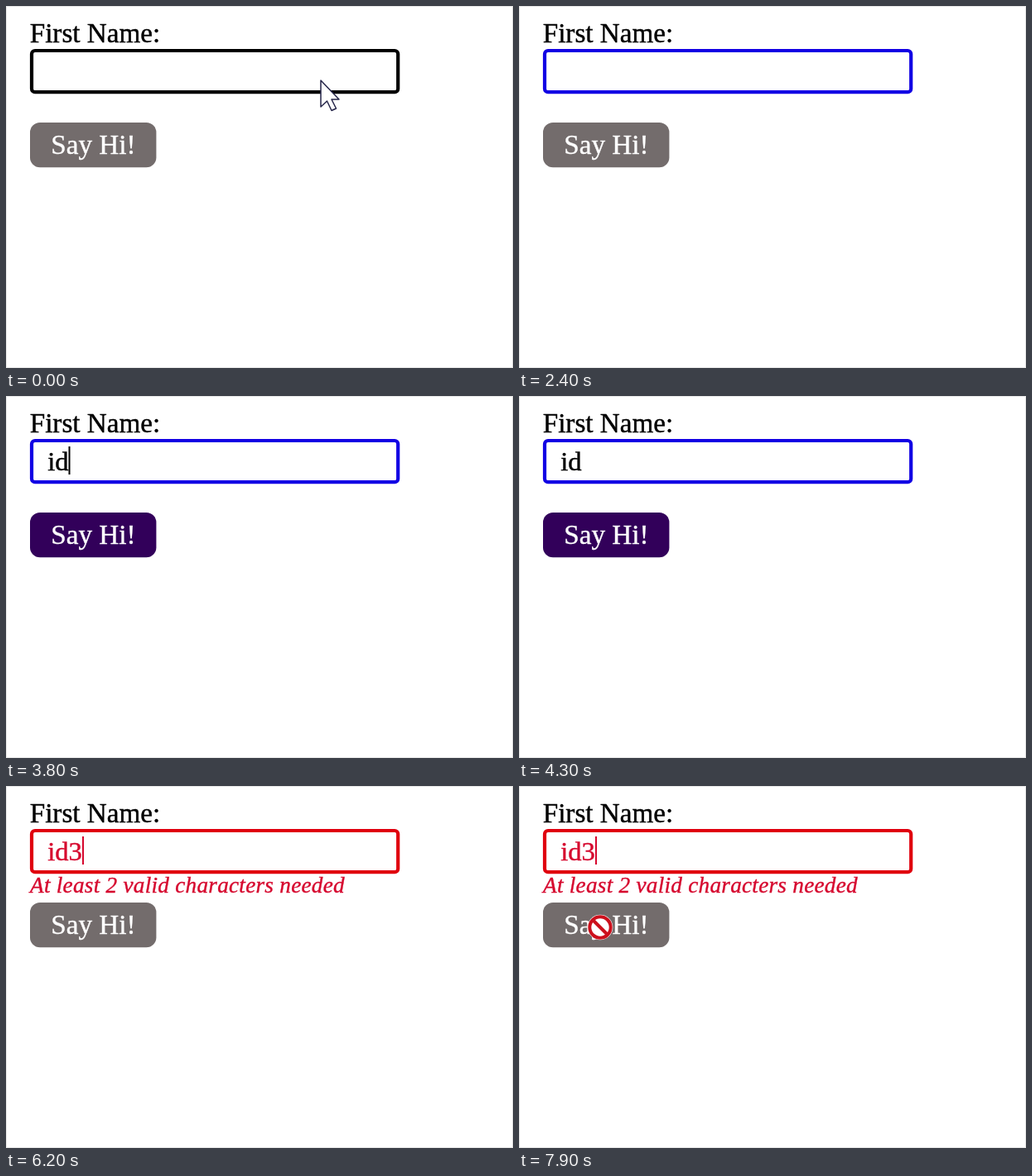
Animation, 612 px wide and 438 px high, one loop 8000 ms. Source, as an HTML page:

```html
<!DOCTYPE html>
<html lang="en">
<head>
<meta charset="utf-8">
<title>Name form</title>
<style>
html, body { margin: 0; width: 100%; height: 100%; overflow: hidden; background: #fff; }
svg { display: block; width: 612px; height: 438px; }
text { font-family: "Liberation Serif", "Times New Roman", serif; font-size: 33.2px; white-space: pre; stroke-width: .4px; }
#value { font-size: 32.6px; }
#error { font-size: 27.2px; font-style: italic; letter-spacing: .27px; fill: #d6082e; stroke: #d6082e; }
</style>
</head>
<body>
<svg viewBox="0 0 612 438">
  <rect x=".5" y=".5" width="611" height="437" fill="#fff" stroke="#e6e6e6"/>
  <text x="28.7" y="44" stroke="#000">First Name:</text>
  <rect id="field" x="31" y="54" width="442.2" height="50.2" rx="4" fill="#fff" stroke-width="4.2"/>
  <text id="value" x="50.2" y="90"></text>
  <rect id="caret" y="61" width="2" height="34"/>
  <text id="error" x="29" y="129">At least 2 valid characters needed</text>
  <rect id="button" x="29" y="141" width="152.4" height="54.2" rx="12"/>
  <text x="54.2" y="179" fill="#fff" stroke="#fff">Say Hi!</text>
  <path id="arrow" d="M380 90V122L387.5 115L393 126.5L398.5 124L393 113H402Z"
    fill="#fff" stroke="#26264a" stroke-width="1.5" stroke-linejoin="round"/>
  <g id="denied" stroke="#cc101c" stroke-width="4">
    <circle r="15.3" fill="#fff" stroke="none"/>
    <circle r="12.7" fill="#fff"/>
    <path d="M-9 -9L9 9"/>
  </g>
</svg>
<script>
const LOOP = 8000;
const el = id => document.getElementById(id);
const [field, value, caret, error, button, arrow, denied] =
  ["field", "value", "caret", "error", "button", "arrow", "denied"].map(el);

const looks = {
  idle:    { border: "#000",    ink: "#000",    button: "#736c6c" },
  focus:   { border: "#1200e4", ink: "#000",    button: "#736c6c" },
  invalid: { border: "#e0000e", ink: "#d6082e", button: "#736c6c" },
  valid:   { border: "#1200e4", ink: "#000",    button: "#32005a" }
};

// start time, look, typed text, caret position
const states = [
  [0, "idle", "", 51],
  [200, "focus", "", 51],
  [2900, "invalid", "i", 59],
  [3800, "valid", "id", 75.5],
  [4800, "invalid", "id3", 92]
];

// the caret flips at each of these times, starting hidden
const blinks = [800, 1300, 1900, 2400, 2900, 4300, 4800, 5400, 5900, 6500, 6900, 7300, 7900];

const show = (node, on) => node.setAttribute("visibility", on ? "visible" : "hidden");
const mix = (a, b, k) => a + (b - a) * k;

function draw(t) {
  const [, name, text, x] = states.filter(s => s[0] <= t).pop();
  const look = looks[name];
  field.setAttribute("stroke", look.border);
  button.setAttribute("fill", look.button);
  value.setAttribute("fill", look.ink);
  value.setAttribute("stroke", look.ink);
  value.textContent = text;
  caret.setAttribute("fill", look.ink);
  caret.setAttribute("x", x);
  show(caret, blinks.filter(b => b <= t).length % 2);
  show(error, name === "invalid");
  show(arrow, t < 200);

  const k = Math.min(1, Math.max(0, (t - 6500) / 350));
  const ease = 1 - (1 - k) ** 2;
  denied.setAttribute("transform", `translate(${mix(108, 98, ease)} ${mix(199, 171, ease)})`);
  show(denied, t >= 6500);
}

let start;
function tick(now) {
  start ??= now;
  draw((now - start) % LOOP);
  requestAnimationFrame(tick);
}
draw(0);
requestAnimationFrame(tick);
</script>
</body>
</html>
```
